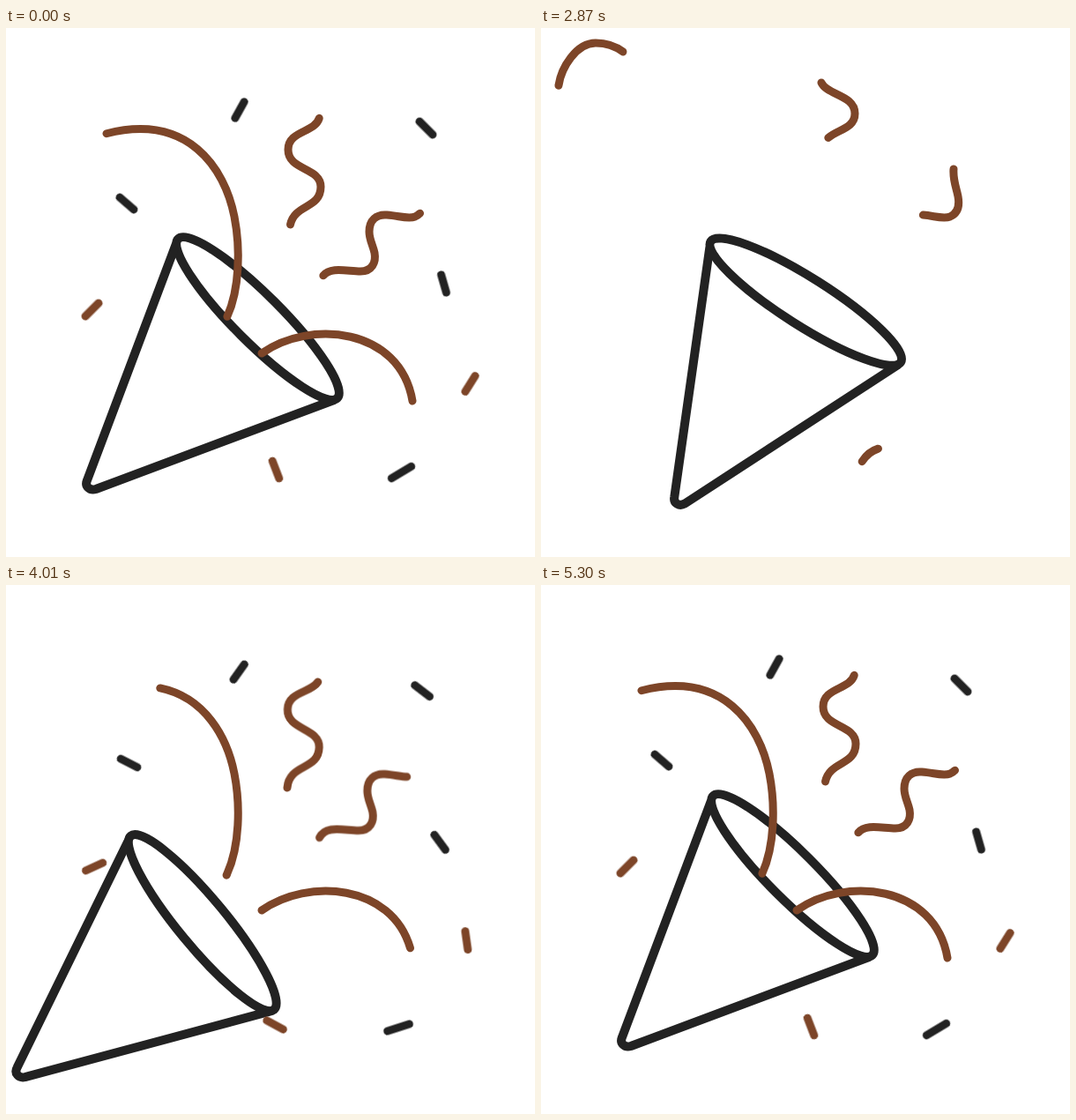
Recreate the animation shown at these times as an HTML page without scripts. Size 600 by 600 pixels, loop 5.33 s.

```html
<!DOCTYPE html>
<html lang="en">
<head>
<meta charset="utf-8">
<title>Party popper</title>
<style>
  html, body { margin: 0; width: 100%; height: 100%; overflow: hidden; background: #fff; }
  svg { display: block; width: 100%; height: 100%; }
  svg * { animation-duration: 5330ms; animation-iteration-count: infinite; animation-timing-function: linear; }
  .ink { stroke: #222; }
  .rust { stroke: #7d4528; }
  .art { fill: none; stroke-width: 9; stroke-linecap: round; stroke-linejoin: round; }

  .cone { stroke-width: 10; transform-origin: 234.5px 380px; animation-name: recoil, tilt; }
  @keyframes recoil {
    0%, 37.5% { translate: 0 0; animation-timing-function: cubic-bezier(.4,0,.6,1); }
    54.4%, 56.3% { translate: 27px -9px; animation-timing-function: cubic-bezier(.4,0,.3,1); }
    65.7% { translate: -75px 55px; }
    70.9% { translate: -75px 54px; animation-timing-function: cubic-bezier(.28,0,.37,1); }
    100% { translate: 0 0; }
  }
  @keyframes tilt {
    0%, 37.5% { rotate: 0deg; animation-timing-function: cubic-bezier(.4,0,.6,1); }
    54.4%, 57.4% { rotate: -12.6deg; animation-timing-function: cubic-bezier(.7,0,.82,1); }
    70.9% { rotate: 6.1deg; animation-timing-function: cubic-bezier(.28,0,.37,1); }
    100% { rotate: 0deg; }
  }

  /* x,y: resting place; sx,sy: launch point; k: exit reach; a: angle; r: launch spin */
  .bit {
    --home: calc(var(--x) * 1px) calc(var(--y) * 1px);
    animation-name: fly, spin, vanish;
  }
  @keyframes fly {
    0%, 37.5% { translate: var(--home); animation-timing-function: cubic-bezier(.5,0,.8,.7); }
    53.7% {
      translate: calc((var(--x) + (var(--x) - 247) * var(--k)) * 1px)
                 calc((var(--y) + (var(--y) - 345) * var(--k)) * 1px);
      animation-timing-function: step-end;
    }
    57.2% {
      translate: calc(var(--sx) * 1px) calc(var(--sy) * 1px);
      animation-timing-function: cubic-bezier(.2,.7,.3,1);
    }
    81.6%, 100% { translate: var(--home); }
  }
  @keyframes spin {
    0%, 37.5% { rotate: calc(var(--a) * 1deg); animation-timing-function: cubic-bezier(.5,0,.8,.7); }
    53.7% { rotate: calc((var(--a) - var(--r)) * 1deg); animation-timing-function: step-end; }
    57.2% { rotate: calc((var(--a) + var(--r)) * 1deg); animation-timing-function: cubic-bezier(.3,.3,.75,1); }
    81.6%, 100% { rotate: calc(var(--a) * 1deg); }
  }
  @keyframes vanish {
    0% { opacity: 1; animation-timing-function: step-end; }
    53.7% { opacity: 0; animation-timing-function: step-end; }
    57.8%, 100% { opacity: 1; }
  }

  /* len: visible length at rest; tail, rest: start and length late in the exit; end: whole path */
  .long { animation-name: long; }
  @keyframes long {
    0%, 37.5% { stroke-dasharray: var(--len) 999px; stroke-dashoffset: -12px; opacity: 1; animation-timing-function: cubic-bezier(.5,0,.7,.8); }
    53.85% { stroke-dasharray: var(--rest) 999px; stroke-dashoffset: var(--tail); opacity: 1; }
    58.48% { stroke-dasharray: 0px 999px; stroke-dashoffset: var(--end); opacity: 1; }
    58.49% { stroke-dasharray: 0px 999px; stroke-dashoffset: 0px; opacity: 0; }
    58.5% { stroke-dasharray: 0px 999px; stroke-dashoffset: 0px; opacity: 1; animation-timing-function: cubic-bezier(.22,0,.2,1); }
    92%, 100% { stroke-dasharray: var(--len) 999px; stroke-dashoffset: -12px; opacity: 1; }
  }
  .short { animation-name: short; }
  @keyframes short {
    0%, 37.5% { stroke-dasharray: var(--len) 999px; stroke-dashoffset: 0px; opacity: 1; animation-timing-function: cubic-bezier(.5,0,.7,.8); }
    53.85% { stroke-dasharray: var(--rest) 999px; stroke-dashoffset: var(--tail); opacity: 1; }
    55.3% { stroke-dasharray: 0px 999px; stroke-dashoffset: var(--end); opacity: 1; }
    55.31%, 57.4% { stroke-dasharray: 0px 999px; stroke-dashoffset: 0px; opacity: 0; }
    57.41% { stroke-dasharray: 0px 999px; stroke-dashoffset: 0px; opacity: 1; animation-timing-function: cubic-bezier(.25,0,.2,1); }
    82.5%, 100% { stroke-dasharray: var(--len) 999px; stroke-dashoffset: 0px; opacity: 1; }
  }

  /* dx,dy,turn: offset and tilt halfway through the burst */
  .wave { animation-name: wave, rise; }
  @keyframes wave {
    0%, 37.5% { stroke-dasharray: var(--len) 999px; stroke-dashoffset: -9px; opacity: 1; animation-timing-function: cubic-bezier(.5,0,.7,.8); }
    53.85% { stroke-dasharray: var(--rest) 999px; stroke-dashoffset: var(--tail); opacity: 1; }
    58.48% { stroke-dasharray: 0px 999px; stroke-dashoffset: var(--end); opacity: 1; }
    58.49% { stroke-dasharray: 0px 999px; stroke-dashoffset: -165px; opacity: 0; }
    58.5% { stroke-dasharray: 0px 999px; stroke-dashoffset: -165px; opacity: 1; }
    66.2% { stroke-dasharray: var(--grow) 999px; stroke-dashoffset: -78px; opacity: 1; animation-timing-function: cubic-bezier(.3,.3,.5,1); }
    75.2% { stroke-dasharray: var(--near) 999px; stroke-dashoffset: -5px; opacity: 1; animation-timing-function: ease-in-out; }
    82.5%, 100% { stroke-dasharray: var(--len) 999px; stroke-dashoffset: -9px; opacity: 1; }
  }
  @keyframes rise {
    0%, 58.49% { translate: 0 0; rotate: 0deg; }
    58.5% {
      translate: calc(var(--dx) * 2.1px) calc(var(--dy) * 2.1px);
      rotate: calc(var(--turn) * 2deg);
      animation-timing-function: cubic-bezier(.3,.4,.7,.8);
    }
    66.2% {
      translate: calc(var(--dx) * 1px) calc(var(--dy) * 1px);
      rotate: calc(var(--turn) * 1deg);
      animation-timing-function: cubic-bezier(.2,.5,.4,1);
    }
    75.2% { translate: calc(var(--dx) * .03px) calc(var(--dy) * .03px); rotate: calc(var(--turn) * .12deg); }
    82%, 100% { translate: 0 0; rotate: 0deg; }
  }
</style>
</head>
<body>
<svg viewBox="0 0 600 600">
  <defs><path id="dash" d="M-10.5 0H10.5"/></defs>
  <g class="art">
    <g class="cone ink">
      <ellipse cx="285.5" cy="329.5" rx="127.7" ry="27" transform="rotate(45 285.5 329.5)"/>
      <path d="M192.5 246L92 513C89 520 95 525 102 523L372 422"/>
    </g>

    <g class="ink">
      <use href="#dash" class="bit" style="--x:265;--y:93;--sx:219;--sy:407;--k:1.15;--a:-61;--r:43"/>
      <use href="#dash" class="bit" style="--x:476.5;--y:113.5;--sx:230;--sy:484;--k:.9;--a:45;--r:-50"/>
      <use href="#dash" class="bit" style="--x:137;--y:199;--sx:280;--sy:365;--k:1.6;--a:41;--r:-92"/>
      <use href="#dash" class="bit" style="--x:496.5;--y:290;--sx:251;--sy:393;--k:1.13;--a:74;--r:-135"/>
      <path d="M-13 0H13" class="bit" style="--x:448.5;--y:504;--sx:254;--sy:390;--k:1.13;--a:-31;--r:87"/>
    </g>

    <g class="rust">
      <use href="#dash" class="bit" style="--x:97.5;--y:319.5;--sx:245;--sy:320;--k:1.9;--a:-45;--r:136"/>
      <use href="#dash" class="bit" style="--x:526.5;--y:403.5;--sx:293;--sy:381;--k:1;--a:-58;--r:-266"/>
      <use href="#dash" class="bit" style="--x:306;--y:501;--sx:255;--sy:387;--k:1.74;--a:69;--r:-269"/>

      <path class="long" style="--len:313px;--tail:-455px;--rest:102px;--end:-557px"
        d="M245.5 338Q249 332 251 327C265 296 266 250 259 214C248 158 206 96 113 120C66 132 16 118 20 65C23 45 40 17 62 17C74 17 85 21 93 27"/>
      <path class="short" style="--len:213px;--tail:-323px;--rest:24px;--end:-347px"
        d="M290 369C345 330 447 340 461 423C468 465 430 472 383 477C376 479 369 484 364 492"/>
      <path class="wave" style="--len:170px;--tail:-141px;--rest:99px;--end:-240px;--grow:105px;--near:170px;--dx:-21;--dy:102;--turn:13;transform-origin:320px 138px"
        d="M322 232C320 198 357 208 357 180C357 158 320 162 320 138C320 114 356 120 356 97C356 76 324 76 318 62"/>
      <path class="wave" style="--len:170px;--tail:-141px;--rest:91px;--end:-232px;--grow:84px;--near:160px;--dx:-75;--dy:82;--turn:0"
        d="M356 289C361 268 384 276 402 276C415 276 420 266 418 255C416 246 412 240 412 231C412 218 420 211 432 212C446 213 456 217 464 214C473 210 475 202 473 191C471 181 467 172 468 160"/>
    </g>
  </g>
</svg>
</body>
</html>
```
